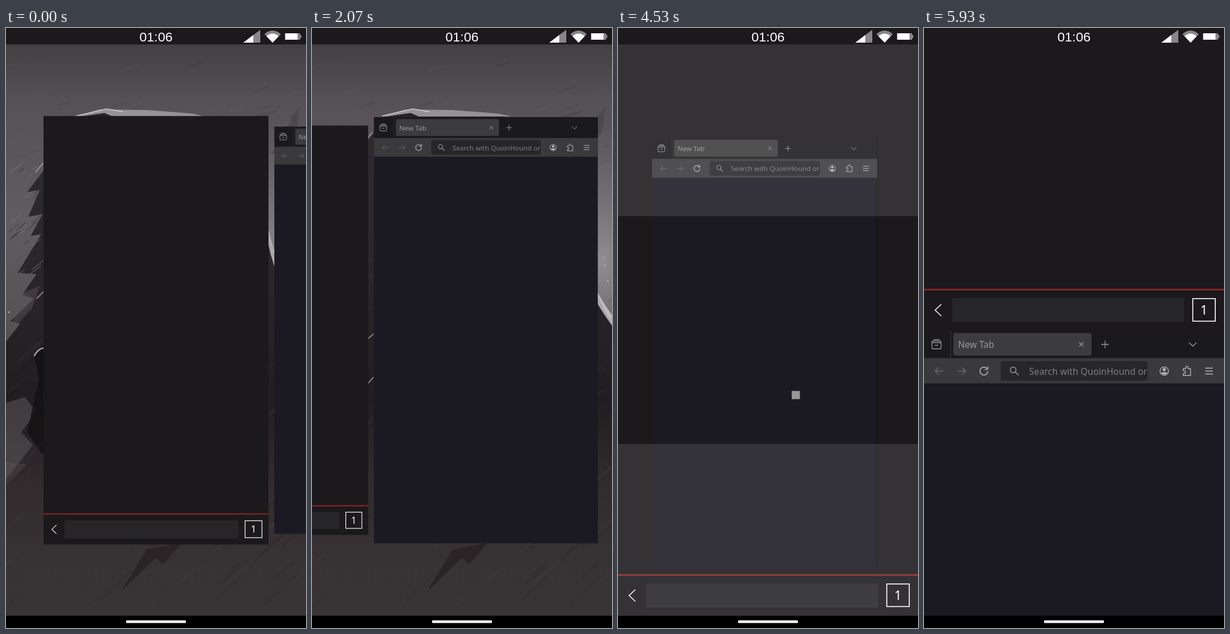
An HTML page with a canvas that plays this animation: 512 by 1024 pixels, repeating every 8000 ms.

```html
<!DOCTYPE html>
<html lang="en">
<head>
<meta charset="utf-8">
<title>Window overview</title>
<style>
  html, body { margin: 0; width: 100%; height: 100%; overflow: hidden; background: #000; }
  canvas { display: block; width: 512px; height: 1024px; }
</style>
</head>
<body>
<canvas id="stage" width="512" height="1024"></canvas>
<script>
const W = 512, H = 1024, TOP = 28, BOTTOM = 1003, FULL = BOTTOM - TOP;
const LOOP = 8000, STEP = 1000 / 15;
const DARK = '#1b191b', UI = '"Noto Sans", sans-serif';
const ctx = document.getElementById('stage').getContext('2d');

const clamp = v => Math.max(0, Math.min(1, v));
const progress = (t, a, b) => clamp((t - a) / (b - a));
const mix = (a, b, u) => a + (b - a) * u;
const smooth = u => u * u * (3 - 2 * u);
const easeOut = (u, k) => 1 - Math.pow(1 - u, k);

function rect(c, color, x, y, w, h, r = 0) {
  c.fillStyle = color;
  c.beginPath();
  c.roundRect(x, y, w, h, r);
  c.fill();
}
function fill(c, color, path) {
  c.fillStyle = color;
  c.fill(new Path2D(path));
}
function stroke(c, color, path, width = 1.3) {
  c.strokeStyle = color;
  c.lineWidth = width;
  c.stroke(new Path2D(path));
}
function text(c, color, str, x, y, font, align = 'left') {
  c.fillStyle = color;
  c.font = font;
  c.textAlign = align;
  c.fillText(str, x, y);
}
function gradient(c, g, stops) {
  stops.forEach(([at, color]) => g.addColorStop(at, color));
  return g;
}

function makeWallpaper() {
  const cv = document.createElement('canvas');
  cv.width = W;
  cv.height = H;
  const c = cv.getContext('2d');
  let seed = 7;
  const rnd = () => (seed = seed * 16807 % 2147483647) / 2147483647;

  rect(c, gradient(c, c.createLinearGradient(0, 28, 0, 1003), [
    [0, '#434044'], [.1, '#555156'], [.3, '#615c61'], [.48, '#575256'],
    [.7, '#403a3d'], [.82, '#383234'], [1, '#383335']
  ]), 0, 0, W, H);
  rect(c, gradient(c, c.createRadialGradient(485, 400, 10, 485, 400, 240),
    [[0, 'rgba(160,156,160,.75)'], [1, 'rgba(120,116,120,0)']]), 0, 28, W, 600);

  // cloak, with a ragged left side
  const cloak = gradient(c, c.createLinearGradient(0, 150, 0, 930), [
    [0, '#302b2e'], [.35, '#2a2528'], [.62, '#221d20'], [.8, '#312b2e'], [1, '#383335']
  ]);
  fill(c, cloak, 'M122 149 L180 140 L320 146 Q400 190 448 350 Q470 430 512 505 V930 H0 V780 ' +
    'L36 745 L0 740 V535 L24 505 L8 500 L48 462 L28 455 L52 420 L20 418 L60 352 L42 355 ' +
    'L62 318 L38 322 L58 276 L36 280 L68 238 Z');
  fill(c, 'rgba(92,86,90,.55)', 'M0 640 L32 630 L52 655 L26 690 L46 712 L0 770 Z');
  fill(c, 'rgba(92,86,90,.45)', 'M20 455 L58 440 L44 480 L10 515 Z');
  fill(c, 'rgba(20,15,18,.8)', 'M64 540 L48 560 L56 600 L36 690 L60 725 H70 V540 Z');

  // lit top of the hood and rim on the right
  fill(c, '#959194', 'M118 151 L160 139 L240 140 L318 146 L340 151 Z');
  fill(c, '#272225', 'M128 151 L168 145 L182 151 Z');
  stroke(c, '#cbc8ca', 'M120 150 L172 138 L200 143', 1.5);
  fill(c, 'rgba(215,211,214,.75)', 'M448 345 Q468 430 512 490 V508 Q462 440 448 370 Z');
  fill(c, 'rgba(70,65,69,.6)', 'M488 150 L500 136 L496 175 L466 215 L452 214 L474 185 Z');
  for (const [x, y] of [[498, 392], [505, 431], [500, 405], [5, 485]])
    rect(c, '#c0bdbf', x - 1, y - 1.5, 2, 3, 1);
  stroke(c, '#bcb8ba', 'M64 546 Q54 548 48 560', 2);
  stroke(c, '#a5a1a3', 'M64 450 L52 462 M66 228 L50 246 M104 178 L96 186 M105 522 L96 530 M105 596 L96 606', 1.5);
  fill(c, '#2a2427', 'M240 890 L300 878 L268 916 L256 904 L196 962 Z');

  // slanted brush marks
  for (let i = 0; i < 170; i++) {
    const x = rnd() * W, y = 60 + rnd() * 930, len = 10 + rnd() * 45;
    c.strokeStyle = rnd() < .5 ? 'rgba(255,250,255,.025)' : 'rgba(0,0,0,.05)';
    c.lineWidth = 1 + rnd() * 4;
    c.beginPath();
    c.moveTo(x, y);
    c.lineTo(x + len, y - len * (y < 300 ? .3 : .9));
    c.stroke();
  }
  for (let i = 0; i < 26; i++) {
    const x = 5 + rnd() * 45, y = 240 + rnd() * 210, len = 8 + rnd() * 16;
    stroke(c, rnd() < .5 ? '#322d30' : '#777276', `M${x} ${y} l${len} ${-len * .8}`, 1);
  }
  return cv;
}

// Both windows are drawn in a 512 wide space with their top left at 0,0.
function terminal(h) {
  rect(ctx, DARK, 0, 0, W, h);
  rect(ctx, '#802725', 0, h - 71, W, 3);
  rect(ctx, '#262527', 48, h - 55, 396, 41);
  stroke(ctx, '#fff', `M29.5 ${h - 44.5} L19 ${h - 34.5} L29.5 ${h - 24.5}`, 1.5);
  ctx.strokeStyle = '#fff';
  ctx.lineWidth = 1.6;
  ctx.strokeRect(458.7, h - 54.2, 38.4, 38.6);
  text(ctx, '#fff', '1', 477.8, h - 27, '22px ' + UI, 'center');
}

function browser(h) {
  const dim = '#6d6c6d', mid = '#999899', lit = '#b9b8b9';
  rect(ctx, '#1b1922', 0, 0, W, h);
  rect(ctx, '#1a191b', 0, 0, W, 47.5);
  rect(ctx, '#3a393b', 0, 47.5, W, 43);
  rect(ctx, '#343335', 45, 0, 1, 47.5);
  rect(ctx, '#3c3b3d', 50, 4.5, 236, 38.5, 4);
  text(ctx, mid, 'New Tab', 58, 30, '15.4px ' + UI);

  // tab strip icons
  stroke(ctx, mid, 'M13.5 21 h15.5 v8.5 q0 2 -2 2 h-11.5 q-2 0 -2 -2 z M13.5 21 q0 -3 2 -3 h11.5 q2 0 2 3 M16 15.7 h10.5 M18.5 25.5 h5.5');
  stroke(ctx, mid, 'M264.7 20 l7.6 7.6 m0 -7.6 l-7.6 7.6 M302.5 24 h13 m-6.5 -6.5 v13 M452.5 21 l6.3 6 l6.3 -6');

  // toolbar icons
  stroke(ctx, dim, 'M33 69.5 h-14 m6 -6 l-6 6 l6 6 M57 69.5 h14 m-6 -6 l6 6 l-6 6');
  stroke(ctx, lit, 'M107 64.7 a6.8 6.8 0 1 0 2 4.8 M108.7 61.5 v5 h-5', 1.5);
  rect(ctx, '#272628', 131, 52.5, 250.5, 33.5, 4);
  stroke(ctx, mid, 'M157 67.5 a4.8 4.8 0 1 0 -9.6 0 a4.8 4.8 0 1 0 9.6 0 M155.7 71 l5.8 5.8', 1.5);
  ctx.save();
  ctx.beginPath();
  ctx.rect(131, 52, 249, 35);
  ctx.clip();
  text(ctx, '#7f7e7f', 'Search with QuoinHound or enter address', 179.5, 75.5, '15.4px ' + UI);
  ctx.restore();
  stroke(ctx, lit, 'M417.2 69.5 a7.2 7.2 0 1 0 -14.4 0 a7.2 7.2 0 1 0 14.4 0');
  fill(ctx, lit, 'M412.8 67 a2.8 2.8 0 1 0 -5.6 0 a2.8 2.8 0 1 0 5.6 0 M405 73.5 q0 -2 2 -2 h6 q2 0 2 2 q-5 4 -10 0');
  stroke(ctx, lit, 'M442.5 65.5 h4 v-2 a2.2 2.2 0 0 1 4.4 0 v2 h4 v11.5 h-12.4 v-3.2 h1.5 a2.2 2.2 0 0 0 0 -4.6 h-1.5 z');
  stroke(ctx, lit, 'M480 64.5 h13 m-13 5 h13 m-13 5 h13');
}

function place(draw, x, y, scale, h = FULL) {
  ctx.save();
  ctx.translate(x, y);
  ctx.scale(scale, scale);
  draw(h);
  ctx.restore();
}

function card(draw, d) {
  const s = .75 - .0375 * Math.abs(d);
  place(draw, 256 + 384.4 * d - W * s / 2, 515.9 - FULL * s / 2, s);
}

function touch(x, y) {
  rect(ctx, '#989799', x - 7, y - 7, 14, 14);
}

function overview(t) {
  ctx.drawImage(wallpaper, 0, 0);
  const end = .3;
  let d = mix(1, end, smooth(progress(t, 1533, 1933)));
  if (t > 2060) d = t > 2340 ? 0 : .1055 * Math.exp((2067 - t) / 60);
  card(terminal, d - 1);
  card(browser, d);
  if (t > 1460 && t < 2060) touch(375 - 384.4 * (1 - d), 613);
  if (t > 2930) touch(309.3, 589.8);
}

function dragging(t) {
  const u = easeOut(progress(t, 4467, 5133), 1.68);
  const x = mix(309.3, 287.5, easeOut(u, 1.76));
  const y = mix(589.8, 816.5, u);
  const left = 64 + x - 309.3, top = 150.9 + y - 589.8, zone = 293;
  place(terminal, 0, TOP, 1);
  rect(ctx, 'rgba(0,0,0,.4)', left + 384, top, 1, 731);
  place(browser, left, top, .75);
  const shade = over => `rgba(255,255,255,${over ? .22 : .11})`;
  rect(ctx, shade(y < TOP + zone), 0, TOP, W, zone);
  rect(ctx, shade(y > BOTTOM - zone), 0, BOTTOM - zone, W, zone);
  if (t < 5460) touch(x, y);
}

function split() {
  place(terminal, 0, TOP, 1, 488);
  place(browser, 0, 516, 1, 487);
}

function bars() {
  rect(ctx, DARK, 0, 0, W, TOP);
  text(ctx, '#fff', '01:06', 256, 22.7, '22.6px "Liberation Sans", Arial, sans-serif', 'center');
  fill(ctx, '#888788', 'M405 25 L434 25 V3 Z');
  fill(ctx, '#fff', 'M405 25 L422 25 V12.1 Z');
  fill(ctx, '#888788', 'M455 25 L441 10.5 Q455 -2 469 10.5 Z');
  fill(ctx, '#fff', 'M455 25 L444.5 14 Q455 5 465.5 14 Z');
  rect(ctx, '#888788', 476.5, 9, 25.5, 11);
  rect(ctx, '#888788', 502, 12, 2, 5);
  rect(ctx, '#fff', 476.5, 9, 21, 11);
  rect(ctx, '#000', 0, BOTTOM, W, H - BOTTOM);
  rect(ctx, '#fff', 205, 1011, 102, 4.5, 1);
}

const wallpaper = makeWallpaper();
const start = performance.now();

function frame(now) {
  const time = Math.max(0, now - start) % LOOP;
  const t = Math.floor(time / STEP + .05) * STEP;
  if (t < 3925) overview(t);
  else if (t < 5795) dragging(t);
  else split();
  bars();
  requestAnimationFrame(frame);
}
frame(start);
</script>
</body>
</html>
```
